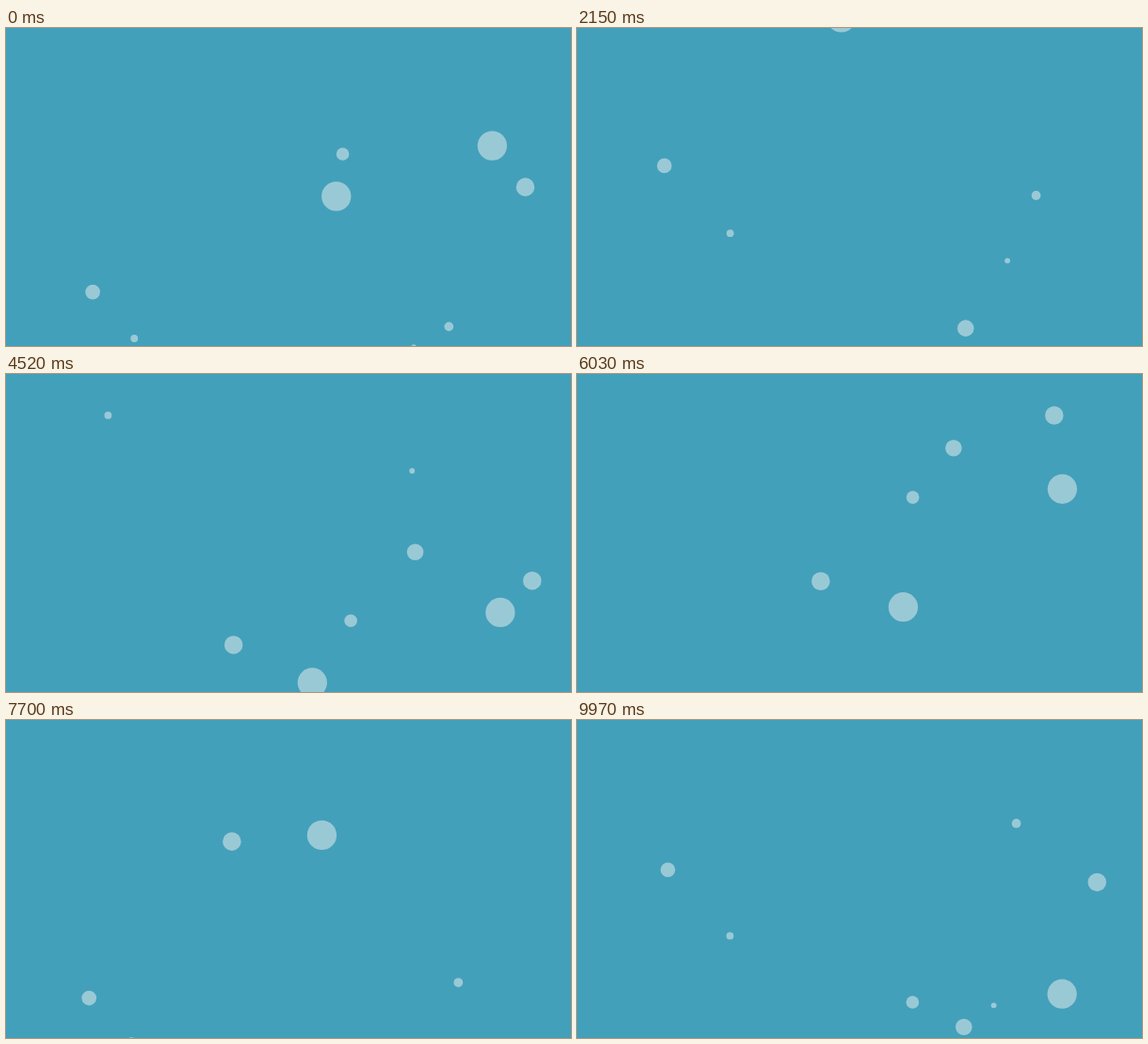
Recreate the animation shown at these times as an HTML page with a canvas. Size 600x338 px, loop 10000 ms.

```html
<!DOCTYPE html>
<html lang="en">
<head>
<meta charset="utf-8">
<title>Rising bubbles</title>
<style>
  html, body { margin: 0; width: 100%; height: 100%; overflow: hidden; background: #43a0ba; }
  canvas { display: block; width: 100vw; height: 100vh; }
</style>
</head>
<body>
<canvas width="600" height="338"></canvas>
<script>
const ctx = document.querySelector('canvas').getContext('2d');
const LOOP = 10, WARM_UP = 11; // seconds
const WIDTH = 1536, HEIGHT = 864, MARGIN = 100, RISE = 1180;

const sizes = [40, 20, 50, 80, 35, 45, 15, 25, 80, 50];
const durations = [8, 8, 10, 7, 6, 8, 9, 7, 6, 5];

// Columns on a 5% grid, wide apart on the left and crowded on the right
const column = i => 2 + Math.floor(Math.min(8 * i / 3, 1.1 * (i + 5)));

// Delays of 0 to 3 seconds, scattered by a quadratic walk
const delay = i => Math.floor(.56 + .92 * i + .08 * i * i) % 4;

const bubbles = sizes.map((size, i) => ({
  r: size / 2,
  left: column(i) * WIDTH / 20,
  duration: durations[i],
  elapsed: WARM_UP - delay(i),
}));

// cubic-bezier(.42, 0, 1, 1), solved with Newton's method
function easeIn(x) {
  let u = x;
  for (let i = 0; i < 6; i++) {
    const error = u * (1.26 + u * (.48 - .74 * u)) - x;
    u -= error / (1.26 + u * (.96 - 2.22 * u));
  }
  return u * u * (3 - 2 * u);
}

// Drift right by 100 during the first half, then left to -200
const drift = p => p < .5 ? 100 * easeIn(2 * p) : 100 - 300 * easeIn(2 * p - 1);

function draw(time) {
  ctx.setTransform(1, 0, 0, 1, 0, 0);
  ctx.clearRect(0, 0, 600, 338);
  ctx.scale(600 / WIDTH, 338 / HEIGHT);
  ctx.fillStyle = 'rgba(241, 241, 241, .5)';
  for (const { r, left, duration, elapsed } of bubbles) {
    const p = (time + elapsed) / duration % 1;
    const y = HEIGHT + MARGIN - r - RISE * easeIn(p);
    ctx.beginPath();
    ctx.arc(left + r + drift(p), y, r, 0, 2 * Math.PI);
    ctx.fill();
  }
}

const start = performance.now();
function tick() {
  draw((performance.now() - start) / 1000 % LOOP);
  requestAnimationFrame(tick);
}
tick();
</script>
</body>
</html>
```
